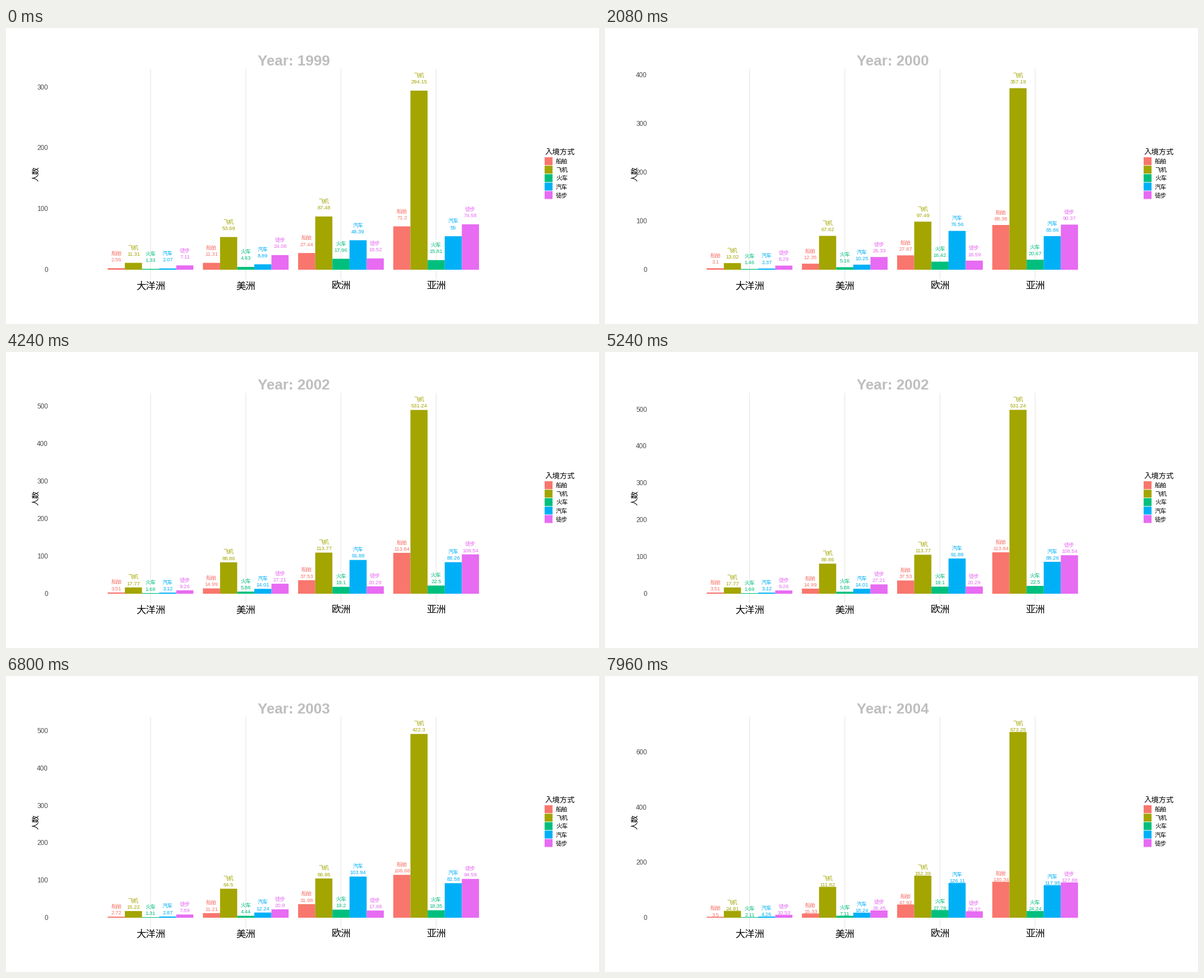
Animation of 1058x529 px, one loop 8000 ms. Source, as a matplotlib script:

```python
import math

import matplotlib.pyplot as plt
import numpy as np
from matplotlib.animation import FuncAnimation
from matplotlib.patches import Rectangle

W, H, DPI = 1058, 529, 100
FRAMES, INTERVAL = 200, 40
STEP = 40                      # frames from one year to the next

BASE, SPAN = 432.0, 341.8      # pixel row of zero, pixel height of the y range
TOP, BOTTOM = 73, 449
CENTER0, PITCH = 257.9, 169.85
BAR = PITCH * 0.9 / 5
LABEL_GAP = 20                 # label height above its bar, in data units

SANS, CJK = "Liberation Sans", "Noto Sans CJK JP"
COLORS = ["#F8766D", "#A3A500", "#00BF7D", "#00B0F6", "#E76BF3"]
MODES = ["船舶", "飞机", "火车", "汽车", "徒步"]
REGIONS = ["大洋洲", "美洲", "欧洲", "亚洲"]
FIRST_YEAR = 1999

# one row per year: five modes for each of the four regions
DATA = np.array([
    [2.56, 11.31, 1.33, 2.07, 7.11, 11.31, 53.69, 4.63, 8.89, 24.08,
     27.44, 87.48, 17.96, 48.39, 18.52, 71.2, 294.15, 15.81, 55, 74.58],
    [3.1, 13.02, 1.46, 2.37, 8.29, 12.35, 67.62, 5.16, 10.25, 26.33,
     27.67, 97.49, 16.42, 76.56, 18.59, 88.38, 357.19, 20.67, 65.86, 90.37],
    [3.19, 14.87, 1.58, 2.63, 8.75, 12.56, 73.47, 5.23, 10.89, 25.7,
     33.15, 101.34, 16.94, 86.43, 18.88, 99.25, 405.54, 20.36, 75.55, 97.54],
    [3.51, 17.77, 1.69, 3.12, 9.26, 14.99, 88.86, 5.88, 14.01, 27.21,
     37.53, 113.77, 19.1, 91.88, 20.29, 113.84, 531.24, 22.5, 88.26, 108.54],
    [2.72, 15.22, 1.31, 2.87, 7.89, 11.21, 64.5, 4.44, 12.24, 20.9,
     31.98, 86.96, 19.2, 103.94, 17.68, 108.68, 422.3, 18.35, 82.58, 94.59],
    [3.5, 24.81, 2.11, 4.26, 10.53, 15.33, 111.82, 7.11, 18.24, 26.45,
     47.92, 152.39, 27.78, 126.11, 23.37, 130.34, 673.25, 24.24, 117.95, 127.88],
])

fig = plt.figure(figsize=(W / DPI, H / DPI), dpi=DPI, facecolor="white")
ax = fig.add_axes([0, 0, 1, 1])
ax.set_xlim(0, W)
ax.set_ylim(H, 0)
ax.axis("off")


def text(x, y, s, px, font=SANS, color="black", ha="center", va="baseline", **kw):
    return ax.text(x, y, s, fontsize=px * 72 / DPI, family=font, color=color,
                   ha=ha, va=va, **kw)


def rect(x, y, w, h, color):
    return ax.add_patch(Rectangle((x, y), w, h, fc=color, lw=0, snap=False))


title = text(513.3, 66.8, "", 26, color="#BEBEBE", weight="bold")
text(53.6, 260.7, "人数", 13.33, CJK, va="center", rotation=90)

for i, region in enumerate(REGIONS):
    cx = CENTER0 + i * PITCH
    ax.plot([cx, cx], [TOP, BOTTOM], color="#EBEBEB", lw=1.42 * 72 / DPI,
            solid_capstyle="butt", snap=False, zorder=0)
    text(cx, 466.1, region, 17.33, CJK)

text(961, 226, "入境方式", 13.33, CJK, ha="left")
for i, (mode, color) in enumerate(zip(MODES, COLORS)):
    y = 231 + 15.12 * i
    rect(961, y, 14.1, 14.1, color)
    text(981, y + 11.2, mode, 10.67, CJK, ha="left")

bars, names, numbers = [], [], []
for k in range(DATA.shape[1]):
    region, mode = divmod(k, 5)
    cx = CENTER0 + region * PITCH + (mode - 2) * BAR
    color = COLORS[mode]
    bars.append(rect(cx - BAR / 2, BASE, BAR, 0, color))
    names.append(text(cx, 0, MODES[mode], 9.48, CJK, color))
    numbers.append(text(cx, 0, "", 9.48, color=color))

ticks = [text(75, 0, "", 11.73, color="#4D4D4D", ha="right") for _ in range(7)]


def position(n):
    """Years passed since the first one; the first leg is one frame shorter."""
    return n / (STEP - 1) if n < STEP - 1 else (n + 1) / STEP


def draw(n):
    p = position(n)
    i = min(int(p), len(DATA) - 2)
    values = DATA[i] + (DATA[i + 1] - DATA[i]) * (p - i)
    nearest = math.floor(p + 0.5)
    limit = values.max() + LABEL_GAP
    scale = SPAN / limit

    title.set_text(f"Year: {FIRST_YEAR + nearest}")
    for k, v in enumerate(values):
        bars[k].set_y(BASE - v * scale)
        bars[k].set_height(v * scale)
        mid = BASE - (v + LABEL_GAP) * scale
        names[k].set_y(mid - 2)
        numbers[k].set_y(mid + 9.2)
        numbers[k].set_text(f"{DATA[nearest, k]:.5g}")

    step = 200 if limit > 526 else 100
    for k, tick in enumerate(ticks):
        value = k * step
        tick.set_visible(value <= limit * 1.05)
        tick.set_text(str(value))
        tick.set_y(BASE + 4.1 - value * scale)
    return []


anim = FuncAnimation(fig, draw, frames=FRAMES, interval=INTERVAL,
                     init_func=lambda: draw(0), repeat=True, repeat_delay=0)
plt.show()
```
